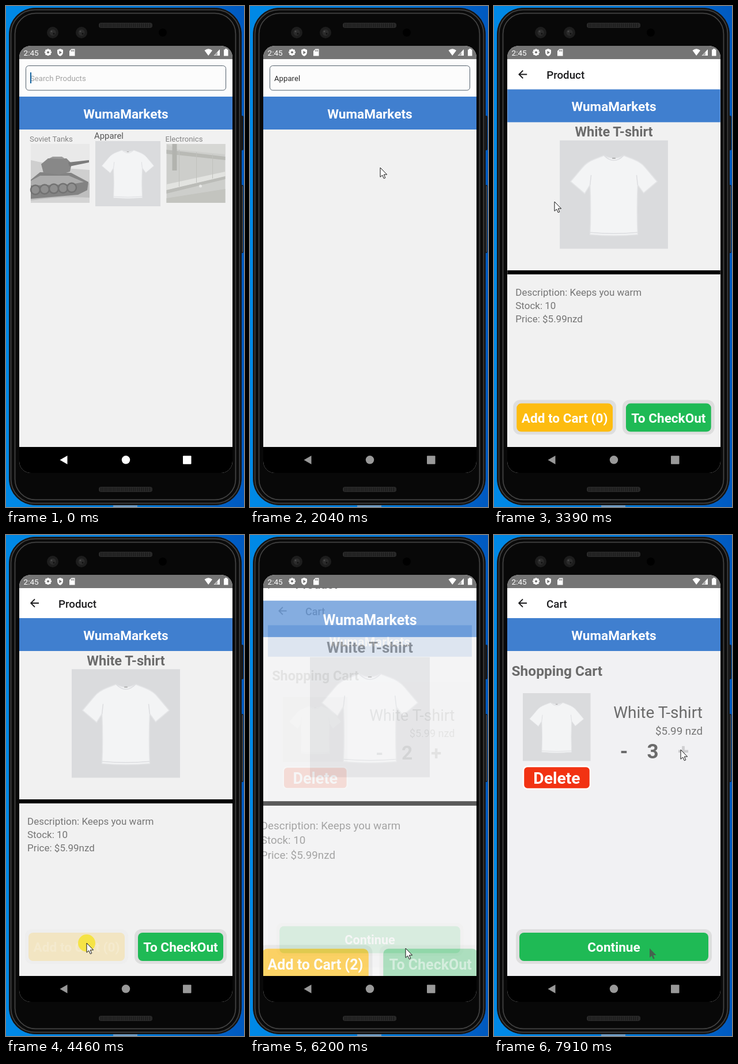
These frames come from a looping animation (413 px wide and 868 px high, 8 s). An HTML page:

```html
<!DOCTYPE html>
<html lang="en">
<head>
<meta charset="utf-8">
<title>Shop app walkthrough</title>
<style>
html, body { margin: 0; width: 100%; height: 100%; overflow: hidden; background: #0078d8; }
svg { display: block; width: 413px; height: 868px; }
text { font-family: Roboto, sans-serif; white-space: pre; }
</style>
</head>
<body>
<svg id="stage" viewBox="0 0 413 868" xmlns="http://www.w3.org/2000/svg"></svg>
<script>
const LOOP = 8000;
const SHOP = 'WumaMarkets';
const BLUE = '#407fcf', GREEN = '#1fba55', GREY = '#6b6b6b';

// ---------- markup helpers ----------
const rect = (x, y, w, h, fill, r = 0, extra = '') =>
  `<rect x="${x}" y="${y}" width="${w}" height="${h}" rx="${r}" fill="${fill}" ${extra}/>`;
const path = (d, fill, extra = '') => `<path d="${d}" fill="${fill}" ${extra}/>`;
const circle = (x, y, r, fill, extra = '') => `<circle cx="${x}" cy="${y}" r="${r}" fill="${fill}" ${extra}/>`;
const text = (x, y, size, fill, str, extra = '') =>
  `<text x="${x}" y="${y}" font-size="${size}" fill="${fill}" ${extra}>${str}</text>`;
const BOLD = 'font-weight="700"', MID = 'text-anchor="middle"', END = 'text-anchor="end"';
const group = (id, body, extra = '') => `<g id="${id}" ${extra}>${body}</g>`;

const SHIRT = 'M41 14Q50 19 59 14L67 17Q75 20 79 25L90 38L77.5 48.5L72 41Q71 65 72 87Q50 89 28 87Q29 65 28 41L23 49L10 38L21 25Q25 20 33 17Z';

const whiteShirt = (x, y, size) => `<g transform="translate(${x} ${y}) scale(${size / 100})">
  ${rect(0, 0, 100, 100, '#dadbdd')}
  ${path(SHIRT, '#f3f4f5', 'stroke="#e4e5e7" stroke-width=".8"')}
  ${path('M41 14Q50 23 59 14M28 41L29 32M72 41L71 32M28 85Q50 87 72 85', 'none', 'stroke="#dcdde0" stroke-width=".8"')}
  ${rect(48.5, 16, 3, 1, '#aaa')}</g>`;

const blackShirt = (x, y, size) => `<g transform="translate(${x} ${y}) scale(${size / 100})">
  ${rect(0, 0, 100, 100, '#fff')}
  <g transform="translate(-6.2 -13.3) scale(1.147 1.18)">${path(SHIRT, '#111')}
  ${path('M41 14Q50 22 59 14', 'none', 'stroke="#333"')}</g></g>`;

const tank = () => {
  const wheels = [8, 24, 40, 56, 71].map(x => circle(x, 80 - x * .06, 8, '#666', 'stroke="#3d3d3d" stroke-width="2.5"')).join('');
  return `<g transform="translate(43 239)">${rect(0, 0, 102, 102, '#e6e6e6')}
  ${path('M0 28Q30 34 60 42L102 45V70H0Z', '#c2c2c2')}
  ${rect(0, 68, 102, 34, '#a9a9a9')}
  ${path('M0 62L16 49L70 50L100 66L98 80L82 88L0 95Z', '#555')}
  ${path('M0 64L16 55L66 55L92 66L70 70L0 72Z', '#909090')}${wheels}
  ${path('M18 35L30 25L62 25L71 34L68 48L50 53L22 50Z', '#5c5c5c')}
  ${path('M32 25L38 22H54L60 26Z', '#777')}
  ${path('M65 32L101 28V32L67 39Z', '#4a4a4a')}
  ${path('M0 98Q50 90 102 93V102H0Z', '#c9c9c9')}</g>`;
};

const shelves = () => `<g transform="translate(278.5 239)">${rect(0, 0, 102, 102, '#bfc0bc')}
  ${path('M0 0H102V18L20 10Z', '#cbccc8')}
  ${path('M0 10L102 22V28L0 17Z', '#a2a39d')}
  ${path('M0 70L102 48V56L0 80Z', '#dddeda')}
  ${path('M0 80L102 56V61L0 86Z', '#a5a6a0')}
  ${path('M0 94L102 78V102H0Z', '#b0b1ab')}
  ${path('M22 10V74M52 14V67M80 18V60', 'none', 'stroke="#acada8"')}
  ${rect(10, 0, 8, 46, '#989993')}${circle(59, 73, 2.5, '#e4e5e2')}</g>`;

const banner = y => rect(23, y, 370, 57, BLUE) + text(208, y + 38, 22.6, '#fff', SHOP, `${BOLD} ${MID}`);

const navHeader = title => rect(23, 92, 370, 52, '#fff') +
  path('M57 118H43.5M50 111.2L43.2 118L50 124.8', 'none', 'stroke="#1c1c1e" stroke-width="1.9"') +
  text(91, 125.5, 18.8, '#1c1c1e', title, 'font-weight="500"');

const button = (id, x, w, fill, label) => group(id,
  rect(x, 683, w, 60, '#dedede', 12) + rect(x + 6, 689, w - 12, 49, fill, 8) +
  text(x + w / 2, 722, 22.6, '#fff', label, `${BOLD} ${MID}`));

const card = (id, x, shirt, name, price) => group(id,
  rect(x, 240, 132, 170, '#f7c0fd') + rect(x + 19, 259, 94, 94, '#f00') +
  `<g class="photo">${shirt(x + 19, 259, 94)}</g>` +
  text(x + 19, 369, 14.8, '#000', name) + text(x + 19, 388, 13.3, '#000', price));

// ---------- screens ----------
const home = rect(23, 92, 370, 672, '#f1f1f1') + rect(23, 92, 370, 65, '#fcfcfc') +
  rect(34.5, 103.5, 347, 42.5, '#fcfcfc', 5, 'stroke="#53606c"') +
  text(42, 130, 13.2, '#a2a2a2', 'Search Products', 'id="hint"') +
  text(42, 130, 13.2, '#2c2c2c', 'Apparel', 'id="query"') +
  rect(42, 115, 2, 19, '#12629e', 0, 'id="caret"') + banner(157) +
  group('categories',
    `<g opacity=".7">${text(41, 235, 13.3, '#555', 'Soviet Tanks')}${tank()}</g>` +
    group('apparel', text(153, 230, 14.9, '#555', 'Apparel') + whiteShirt(155, 234, 113)) +
    `<g opacity=".7">${text(276.5, 235, 13.2, '#555', 'Electronics')}${shelves()}</g>`) +
  group('results', card('whiteCard', 38, whiteShirt, 'White T-shirt', '$5.99 nzd') +
    card('blackCard', 200, blackShirt, 'Black T-shirt', '$4.99 nzd'));

const product = rect(23, 92, 370, 672, '#f1f1f1') + navHeader('Product') + banner(144) +
  text(208, 226, 23.6, GREY, 'White T-shirt', `${BOLD} ${MID}`) + whiteShirt(114, 232.5, 188) +
  rect(23, 458, 370, 7, '#000') +
  ['Description: Keeps you warm', 'Stock: 10', 'Price: $5.99nzd']
    .map((line, i) => text(37, 502 + 23 * i, 17, '#757575', line)).join('') +
  button('add', 33, 179, '#fdbc10', 'Add to Cart (0)') + button('checkout', 223, 160, GREEN, 'To CheckOut');

const cart = rect(23, 92, 370, 672, '#f1f1f3') + navHeader('Cart') + banner(144) +
  text(30.5, 244, 24.5, GREY, 'Shopping Cart', BOLD) + whiteShirt(50, 274, 117.5) +
  rect(51, 401, 116, 39, '#f23212', 7, 'stroke="#fff" stroke-width="2.5"') +
  text(109, 431, 28.3, '#fff', 'Delete', `${BOLD} ${MID}`) +
  text(362, 317, 28, GREY, 'White T-shirt', END) + text(362, 346, 18.8, '#777', '$5.99 nzd', END) +
  text(225.5, 387, 35, GREY, '-', `${BOLD} ${MID}`) +
  text(275.5, 387, 35, GREY, '2', `${BOLD} ${MID} id="quantity"`) +
  text(328.5, 387, 35, GREY, '+', `${BOLD} ${MID} id="plus"`) +
  button('continue', 38, 340, GREEN, 'Continue');

// ---------- phone ----------
const grille = y => rect(161, y, 93, 9, '#2b2b2b', 4) +
  path(`M164 ${y + 4.5}H252`, 'none', 'stroke="#191919" stroke-width="7" stroke-dasharray="1.5 2"');
const lens = x => circle(x, 46, 10, '#1d1d1d') + circle(x, 46, 5.5, '#2b2b2b') +
  circle(x - 2, 44, 1.5, '#484848') + circle(x + 2, 48, 1.5, '#101010');

const phone = rect(0, 0, 413, 868, 'url(#desktop)') + rect(186, 865, 42, 3, '#6d9cc6') +
  rect(404, 190, 8, 60, '#17181b', 2) + rect(404, 310, 8, 118, '#1b1c20', 2) +
  path('M410.5 312V426', 'none', 'stroke="#56595f"') +
  rect(5.5, 3.5, 403, 861, '#0c0c0c', 45, 'stroke="#202020"') +
  rect(8.5, 6.5, 397, 855, 'none', 42, 'stroke="#3c3c3c" stroke-width="2"') +
  rect(12, 10, 390, 848, 'none', 39, 'stroke="#0a0a0a" stroke-width="3"') +
  rect(15.5, 12.5, 383, 843, 'none', 36, 'stroke="#484848" stroke-width="1.5"') +
  rect(18, 15, 378, 838, '#080808', 33) +
  grille(29) + grille(833) + lens(81) + lens(131) + circle(272, 46, 7, '#000');

const teeth = Array.from({ length: 8 }, (_, i) =>
  rect(71.6, 74.4, 2.8, 11.6, '#fff', 0.5, `transform="rotate(${i * 45} 73 80.2)"`)).join('');

const statusBar = rect(23, 69, 370, 23, '#757575') + text(30.5, 85.5, 13.6, '#fff', '2:45') +
  teeth + circle(73, 80.2, 4.6, '#fff') + circle(73, 80.2, 2, '#757575') +
  path('M94 74L99 76V80Q99 85 94 87Q89 85 89 80V76Z', '#fff') + path('M92.4 77.5L97 80.5L92.4 83.5Z', '#757575') +
  path('M113.5 74.5H119.5V86.5H110V78Z', '#fff') + path('M113.5 76V79M115.5 76V79M117.5 76V79', 'none', 'stroke="#757575"') +
  path('M344.5 77Q351.2 71.5 358 77L351.2 86Z', '#fff') +
  path('M360.5 86L371 75V86Z', '#fff') + path('M361.5 85.5L367 79.8V85.5Z', '#a8a8a8') +
  path('M378 75.5H380V74H383.5V75.5H385.5V86.5H378Z', '#fff');

const navBar = rect(23, 764, 370, 45, '#000') +
  group('nav', '<path d="M93.5 786.5L106.5 779V794Z"/><circle cx="208" cy="786.3" r="7.2"/><rect x="307" y="779.3" width="14.5" height="14.5" rx="1"/>');

const ARROW = 'M0 0V16.3L3.7 13L6.3 18.8L8.8 17.7L6.3 12H11.6Z';

document.getElementById('stage').innerHTML = `<defs>
  <linearGradient id="desktop"><stop offset="0" stop-color="#0089e6"/><stop offset=".6" stop-color="#0078d8"/><stop offset="1" stop-color="#0059c0"/></linearGradient>
  <clipPath id="glass"><rect x="23" y="69" width="370" height="740" rx="20"/></clipPath>
  <clipPath id="view"><rect x="23" y="92" width="370" height="672"/></clipPath></defs>
  ${phone}<g clip-path="url(#glass)">${rect(23, 69, 370, 740, '#fff')}
  <g clip-path="url(#view)">${group('cart', cart)}${group('product', product)}${group('home', home)}</g>
  ${statusBar}${navBar}</g>
  ${path(ARROW, '#45624e', 'id="trace" transform="translate(270 716)"')}
  ${circle(0, 0, 15, '#f6e32f', 'id="click" opacity=".85"')}
  ${path(ARROW, '#fff', 'id="mouse" stroke="#111" stroke-width="1" stroke-linejoin="round"')}`;

// ---------- motion ----------
const el = {};
document.querySelectorAll('[id]').forEach(node => el[node.id] = node);
const addLabel = el.add.querySelector('text');
const photos = document.querySelectorAll('.photo');

const clamp = v => Math.max(0, Math.min(1, v));
const ramp = (t, from, to) => clamp((t - from) / (to - from));
const smooth = v => v * v * (3 - 2 * v);
const show = (node, on) => node.setAttribute('visibility', on ? 'visible' : 'hidden');
const alpha = (node, a) => node.setAttribute('opacity', a);
// Each layer fades on its own, so the layers below shine through.
const layerAlpha = (node, a) => [...node.children].forEach(child => alpha(child, a));

// Opacity of a control that is pressed and let go.
const press = (t, down, up) => t < up ? 1 - .8 * ramp(t, down, down + 150) : .2 + .8 * ramp(t, up, up + 250);

const TO_PRODUCT = 3160, TO_CART = 6117;
const zoom = (t, start) => 1 - Math.pow(1 - ramp(t, start, start + 400), 5.25);
const crossfade = (t, start) => ramp(t, start + 66, start + 116);

function place(node, scale, opacity) {
  show(node, opacity > 0);
  alpha(node, opacity);
  node.setAttribute('transform', `translate(208 428) scale(${scale}) translate(-208 -428)`);
}

// time, x, y
const TRACK = [[470, 360, 752], [600, 323, 335], [680, 323, 335], [750, 343, 322], [1360, 226, 280],
  [2430, 226, 280], [2900, 105, 339], [3740, 105, 339], [4300, 140, 707], [5380, 140, 707],
  [5850, 270, 716], [6700, 270, 716], [7250, 332, 374], [7420, 324, 372], [LOOP, 324, 372]];

function pointer(t) {
  const i = Math.max(1, TRACK.findIndex(key => key[0] > t));
  const [a, b] = [TRACK[i - 1], TRACK[i]];
  const k = smooth(ramp(t, a[0], b[0]));
  return [a[1] + (b[1] - a[1]) * k, a[2] + (b[2] - a[2]) * k];
}

const CLICKS = [[1770, 1950], [2940, 3090], [4330, 4530], [4860, 5010], [5900, 6040], [7480, 7780]];

function render(t) {
  const searched = t >= 1960;
  show(el.caret, t < 200 || (t >= 750 && t < 1250));
  el.hint.style.display = searched ? 'none' : '';
  el.query.style.display = searched ? '' : 'none';
  el.categories.style.display = searched ? 'none' : '';
  el.results.style.display = t >= 2430 ? '' : 'none';
  layerAlpha(el.apparel, press(t, 1770, 1960));

  layerAlpha(el.whiteCard, press(t, 2950, 3150));
  const loaded = ramp(t, 2430, 2730);
  photos.forEach(photo => alpha(photo, loaded * (photo.parentNode === el.whiteCard ? press(t, 2950, 3150) : 1)));

  layerAlpha(el.add, press(t, 4300, 4560) * press(t, 4860, 5080));
  addLabel.textContent = `Add to Cart (${t < 4560 ? 0 : t < 5080 ? 1 : 2})`;
  layerAlpha(el.checkout, press(t, 5900, 6105));

  alpha(el.plus, press(t, 7480, 7895));
  el.quantity.textContent = t < 7840 ? 2 : 3;

  const zoomA = zoom(t, TO_PRODUCT), fadeA = crossfade(t, TO_PRODUCT);
  const zoomB = zoom(t, TO_CART), fadeB = crossfade(t, TO_CART);
  place(el.home, 1 + .15 * zoomA, 1 - fadeA);
  place(el.product, t < TO_CART ? .85 + .15 * zoomA : 1 + .15 * zoomB, fadeA * (1 - fadeB));
  place(el.cart, .85 + .15 * zoomB, fadeB);

  const shade = Math.round(255 - 102 * ramp(t, 1250, 1770));
  el.nav.setAttribute('fill', `rgb(${shade},${shade},${shade})`);

  const [x, y] = pointer(t);
  const at = `translate(${x.toFixed(1)} ${y.toFixed(1)})`;
  el.mouse.setAttribute('transform', at);
  el.click.setAttribute('transform', at);
  show(el.mouse, t >= 470);
  show(el.click, CLICKS.some(([down, up]) => t >= down && t < up));
  show(el.trace, t >= 6730);
}

const start = performance.now();
function tick() {
  render((performance.now() - start) % LOOP);
  requestAnimationFrame(tick);
}
tick();
</script>
</body>
</html>
```
